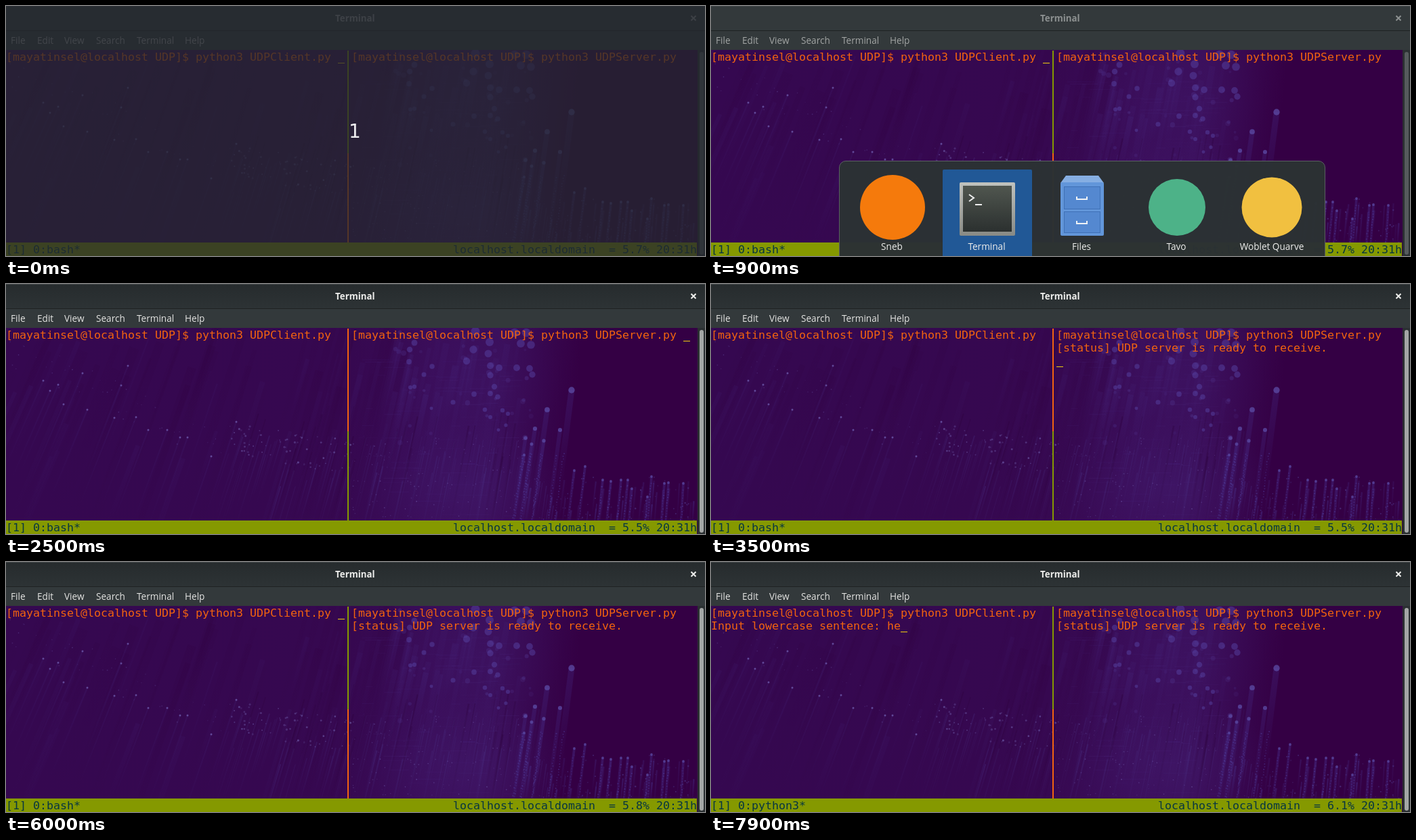
An HTML page with a canvas that plays this animation: 1032x370 px, repeating every 8000 ms.

```html
<!DOCTYPE html>
<html lang="en">
<head>
<meta charset="utf-8">
<title>Terminal</title>
<style>
  html, body { margin: 0; width: 100%; height: 100%; overflow: hidden; background: #33393b; }
  #stage { position: relative; width: 1032px; height: 370px; overflow: hidden; }
  #stage * { position: absolute; }
  #stage svg * { position: static; }

  .ui { font: 13.6px/28px "Open Sans", "Noto Sans", sans-serif; white-space: pre; }
  #title { left: 0; top: 0; width: 1032px; height: 36px; line-height: 36px;
    font-weight: 700; font-size: 13.3px; color: #8d9191; background: #33393b;
    border-bottom: 1px solid #1e2122; box-shadow: inset 0 1px #3f4547; }
  #title span { left: 486px; top: 0; }
  #close { left: 1010px; top: 13px; stroke: currentColor; stroke-width: 2; }
  #menu { left: 0; top: 37px; width: 1032px; height: 28px; color: #a2a5a4; background: #33393b; }
  #menu span { top: 0; }
  .focus #title { color: #eeeeec; background: linear-gradient(#262b2d, #2d3335); }
  .focus #menu { color: #e4e4e2; }

  #wallpaper { left: 0; top: 65px; }
  .row { left: 0; height: 19px; white-space: pre; color: #f2630f;
    font: 16.61px/19px "DejaVu Sans Mono", monospace; }
  .divider { left: 504px; width: 2px; background: #859900; }
  #upper { top: 66px; height: 152px; }
  #lower { top: 218px; height: 132px; background: #f2630f; }
  .right #upper { background: #f2630f; }
  .right #lower { background: #859900; }
  #cursor { width: 10px; height: 1px; background: #f0cf10; }
  #bar { left: 0; top: 350px; width: 1020px; height: 20px; background: #859900; }
  #bar .row { top: 1px; color: #073642; }
  #scroll { left: 1021px; top: 65px; width: 11px; height: 305px; background: #2b3032; }
  #slider { left: 3px; top: 3px; width: 6px; height: 300px; border-radius: 3px; background: #565b5d; }
  .focus #slider { background: #a4a7a6; }

  #switcher { left: 189px; top: 229px; width: 716px; height: 160px; border: 1px solid #5b6062;
    border-radius: 10px; background: rgba(43, 49, 51, .98); }
  #switcher svg { left: -190px; top: -230px; }
  #switcher span { width: 140px; text-align: center; top: 112px; color: #eeeeec; }

  #dim { inset: 0; background: rgba(36, 40, 46, .76); }
  #dim span { left: 506px; top: 168px; font: 28px/36px "DejaVu Sans", sans-serif; color: #eeeef0; }
</style>
</head>
<body>
<div id="stage">
  <div id="title" class="ui"><span>Terminal</span>
    <svg id="close" width="10" height="10"><path d="M1.5 1.5l7 7m0-7l-7 7"/></svg>
  </div>
  <div id="menu" class="ui">
    <span style="left:7px">File</span><span style="left:46px">Edit</span>
    <span style="left:86px">View</span><span style="left:133px">Search</span>
    <span style="left:193px">Terminal</span><span style="left:264px">Help</span>
  </div>

  <canvas id="wallpaper" width="1021" height="305"></canvas>
  <div class="row" style="top:66px">[mayatinsel@localhost UDP]$ python3 UDPClient.py</div>
  <div class="row" style="top:85px" id="input"></div>
  <div class="row" style="top:66px;left:510px">[mayatinsel@localhost UDP]$ python3 UDPServer.py</div>
  <div class="row" style="top:85px;left:510px" id="output"></div>
  <div class="divider" id="upper"></div>
  <div class="divider" id="lower"></div>
  <div id="cursor"></div>
  <div id="bar">
    <div class="row" id="job"></div>
    <div class="row" id="load" style="left:660px"></div>
  </div>
  <div id="scroll"><div id="slider"></div></div>

  <div id="switcher">
    <svg width="1032" height="370">
      <defs>
        <linearGradient id="frame" x2="0" y2="1"><stop stop-color="#c0c2be"/><stop offset="1" stop-color="#888a85"/></linearGradient>
        <linearGradient id="screen" x2="0" y2="1"><stop stop-color="#50564f"/><stop offset="1" stop-color="#2b302f"/></linearGradient>
      </defs>
      <circle cx="268" cy="298" r="48" fill="#f57a0c"/>
      <rect x="342" y="242" width="132" height="130" rx="2" fill="#215896"/>
      <rect x="367" y="261" width="82" height="79" rx="2" fill="url(#frame)"/>
      <rect x="372" y="266" width="72" height="68" fill="url(#screen)"/>
      <path d="M381 279l7 5-7 5M390 294h10" fill="none" stroke="#eee" stroke-width="2"/>
      <path d="M524 251h48l8 11h-64z" fill="#86aee2"/>
      <rect x="516" y="261" width="64" height="79" rx="2" fill="#6296da"/>
      <g fill="#5488d0" stroke="#3f70b6">
        <rect x="521.5" y="267.5" width="53" height="33"/><rect x="521.5" y="304.5" width="53" height="31"/>
      </g>
      <path d="M540 282v4h15v-4M540 318v4h15v-4" fill="none" stroke="#eef2f6" stroke-width="2"/>
      <circle cx="688" cy="298" r="42" fill="#4db288"/>
      <circle cx="828" cy="298" r="44.5" fill="#f1c040"/>
    </svg>
    <span class="ui" style="left:7px">Sneb</span><span class="ui" style="left:147px">Terminal</span>
    <span class="ui" style="left:287px">Files</span><span class="ui" style="left:427px">Tavo</span>
    <span class="ui" style="left:568px">Woblet Quarve</span>
  </div>
  <div id="dim"><span>1</span></div>
</div>

<script>
const $ = id => document.getElementById(id);

function paintWallpaper() {
  const g = $('wallpaper').getContext('2d');
  let seed = 11;
  const rnd = (a, b) => {
    seed = (seed * 16807) % 2147483647;
    return a + (b - a) * seed / 2147483647;
  };
  const lean = x => 0.06 + Math.max(0, 1000 - x) * 0.0004;
  const times = (n, fn) => { for (let i = 0; i < n; i++) fn(i); };

  const streak = (x, y, length, width, rgb, alpha) => {
    const endX = x - lean(x) * length, endY = y + length;
    const fade = g.createLinearGradient(x, y, endX, endY);
    fade.addColorStop(0, `rgba(${rgb},${alpha})`);
    fade.addColorStop(1, `rgba(${rgb},0)`);
    g.strokeStyle = fade;
    g.lineWidth = width;
    g.beginPath();
    g.moveTo(x, y);
    g.lineTo(endX, endY);
    g.stroke();
  };
  const dot = (x, y, r, alpha, rgb = '100,84,168') => {
    g.fillStyle = `rgba(${rgb},${alpha})`;
    g.beginPath();
    g.arc(x, y, r, 0, 7);
    g.fill();
  };
  const glow = (x, y, r, squash, rgb, alpha) => {
    g.save();
    g.translate(x, y);
    g.scale(1, squash);
    const fill = g.createRadialGradient(0, 0, 0, 0, 0, r);
    fill.addColorStop(0, `rgba(${rgb},${alpha})`);
    fill.addColorStop(1, `rgba(${rgb},0)`);
    g.fillStyle = fill;
    g.fillRect(-r, -r, 2 * r, 2 * r);
    g.restore();
  };
  const pairs = (list, fn) => { for (let i = 0; i < list.length; i += 2) fn(list[i], list[i + 1]); };

  g.translate(0, -65);
  const base = g.createLinearGradient(0, 200, 825, 300);
  [[0, '#350850'], [.6, '#360850'], [.75, '#3a0d59'], [.86, '#3b0f5b'], [1, '#340044']]
    .forEach(stop => base.addColorStop(...stop));
  g.fillStyle = base;
  g.fillRect(0, 65, 1021, 305);
  glow(680, 300, 150, .7, '70,34,120', .32);
  glow(690, 140, 130, .9, '66,28,114', .2);

  times(45, () => streak(rnd(0, 620), rnd(20, 160), rnd(160, 300), rnd(4, 16), '48,0,64', rnd(.05, .26)));
  times(40, () => streak(rnd(0, 800), rnd(60, 260), rnd(80, 200), rnd(2, 8), '66,32,118', rnd(.04, .16)));
  times(110, () => streak(rnd(320, 800), rnd(215, 300), rnd(50, 130), rnd(.6, 2), '76,54,142', rnd(.08, .3)));
  times(40, () => streak(rnd(360, 790), rnd(180, 260), rnd(90, 170), rnd(1, 3), '44,0,60', rnd(.15, .4)));
  times(26, () => streak(rnd(570, 780), rnd(70, 170), rnd(80, 160), rnd(5, 10), '74,48,140', rnd(.05, .15)));

  // faint weave across the middle
  times(80, () => {
    g.fillStyle = `rgba(92,66,156,${rnd(.04, .13)})`;
    g.fillRect(rnd(520, 735), rnd(110, 345), rnd(10, 45), 1);
  });
  times(120, () => dot(rnd(500, 770), rnd(225, 345), rnd(.5, 1), rnd(.2, .5), '114,94,176'));
  times(65, () => {
    const x = rnd(325, 510);
    dot(x, 205 + (x - 325) * .14 + rnd(0, 50), rnd(.7, 1.7), rnd(.2, .65), '112,94,172');
  });
  times(45, () => {
    const x = rnd(0, 320);
    dot(x, 85 + x * .48 + rnd(-20, 35), rnd(.5, 1), rnd(.15, .45), '104,84,166');
  });
  times(35, () => dot(rnd(575, 780), rnd(70, 235), rnd(1.5, 4), rnd(.1, .3), '88,66,160'));

  const bokeh = [680,114, 690,97, 714,86, 712,103, 715,121, 728,124, 754,124, 775,90, 760,88,
    751,72, 768,72, 777,134, 773,125, 715,135, 721,152, 715,162, 726,167, 691,163, 660,175,
    741,192, 715,197, 707,186, 733,187, 738,209, 727,216, 628,184, 597,153, 603,152, 595,115,
    617,134, 629,122, 596,97, 603,87, 693,70];
  pairs(bokeh, (x, y) => dot(x, y, Math.max(1.8, 8.3 - y / 37) * (x < 650 ? .75 : 1), .5, '86,66,162'));

  const stalks = [835,157, 799,186, 818,216, 781,214, 767,228, 776,237, 794,232, 765,253, 855,270,
    839,276, 881,290, 893,292, 908,290, 918,290, 924,303, 953,285, 972,295, 978,294, 1000,295, 947,315];
  pairs(stalks, (x, y) => {
    const r = Math.max(1.9, 8.9 - y / 37);
    streak(x, y, y < 240 ? 140 : 110, r * 1.9, '72,48,144', y < 240 ? .28 : .4);
    dot(x, y, r, .75, '92,76,166');
    for (let d = 10; y + d < 350; d += 4) {
      if (y + d > 250) dot(x - lean(x) * d + rnd(-1, 1), y + d, 1.1, rnd(.15, .5), '84,68,162');
    }
  });
  times(40, () => streak(rnd(770, 1021), rnd(290, 340), rnd(25, 60), rnd(1, 3), '74,54,148', rnd(.15, .4)));
  times(60, () => dot(rnd(765, 1018), rnd(285, 350), rnd(.6, 1.3), rnd(.15, .5), '92,76,166'));

  const sparks = [65,158, 85,178, 120,186, 55,143, 77,149, 113,132, 170,150, 180,121, 160,198,
    192,197, 210,216, 238,216, 257,227, 268,227, 303,255, 340,204];
  pairs(sparks, (x, y) => {
    streak(x, y, 130, 2, '70,42,130', .18);
    dot(x, y, 1.5, .75, '112,94,176');
  });
}

// each step overrides part of the state; cursor is [x, row] or null
const prompt = 'Input lowercase sentence: ';
const steps = [
  [0, { dim: true, focus: false, switcher: false, right: false, cursor: [490, 0],
        input: '', output: '', job: 'bash', load: '5.7' }],
  [300, { dim: false }],
  [900, { switcher: true }],
  [1000, { switcher: false, focus: true }],
  [1600, { cursor: null }],
  [2000, { cursor: [490, 0] }],
  [2400, { right: true, cursor: [1000, 0] }],
  [2500, { load: '5.5' }],
  [3200, { cursor: null }],
  [3300, { cursor: [510, 1] }],
  [3500, { output: '[status] UDP server is ready to receive.', cursor: [510, 2] }],
  [3900, { cursor: null }],
  [4100, { job: 'python3', load: '6.2' }],
  [4500, { cursor: [510, 2] }],
  [4900, { load: '6.0' }],
  [5100, { right: false, cursor: [490, 0], job: 'bash' }],
  [6000, { load: '5.8' }],
  [6100, { cursor: null }],
  [6500, { input: prompt, cursor: [260, 1] }],
  [7100, { cursor: null, job: 'python3' }],
  [7500, { load: '6.1' }],
  [7700, { input: prompt + 'h', cursor: [270, 1] }],
  [7900, { input: prompt + 'he', cursor: [280, 1] }],
];

function render(time) {
  const now = time % 8000;
  const s = Object.assign({}, ...steps.filter(([at]) => at <= now).map(([, change]) => change));
  $('stage').classList.toggle('focus', s.focus);
  $('stage').classList.toggle('right', s.right);
  $('dim').hidden = !s.dim;
  $('switcher').hidden = !s.switcher;
  $('cursor').hidden = !s.cursor;
  if (s.cursor) {
    $('cursor').style.left = s.cursor[0] + 'px';
    $('cursor').style.top = 84 + 19 * s.cursor[1] + 'px';
  }
  $('input').textContent = s.input;
  $('output').textContent = s.output;
  $('job').textContent = `[1] 0:${s.job}*`;
  $('load').textContent = `localhost.localdomain  = ${s.load}% 20:31h`;
}

function tick() {
  render(performance.now());
  requestAnimationFrame(tick);
}

paintWallpaper();
tick();
</script>
</body>
</html>
```
